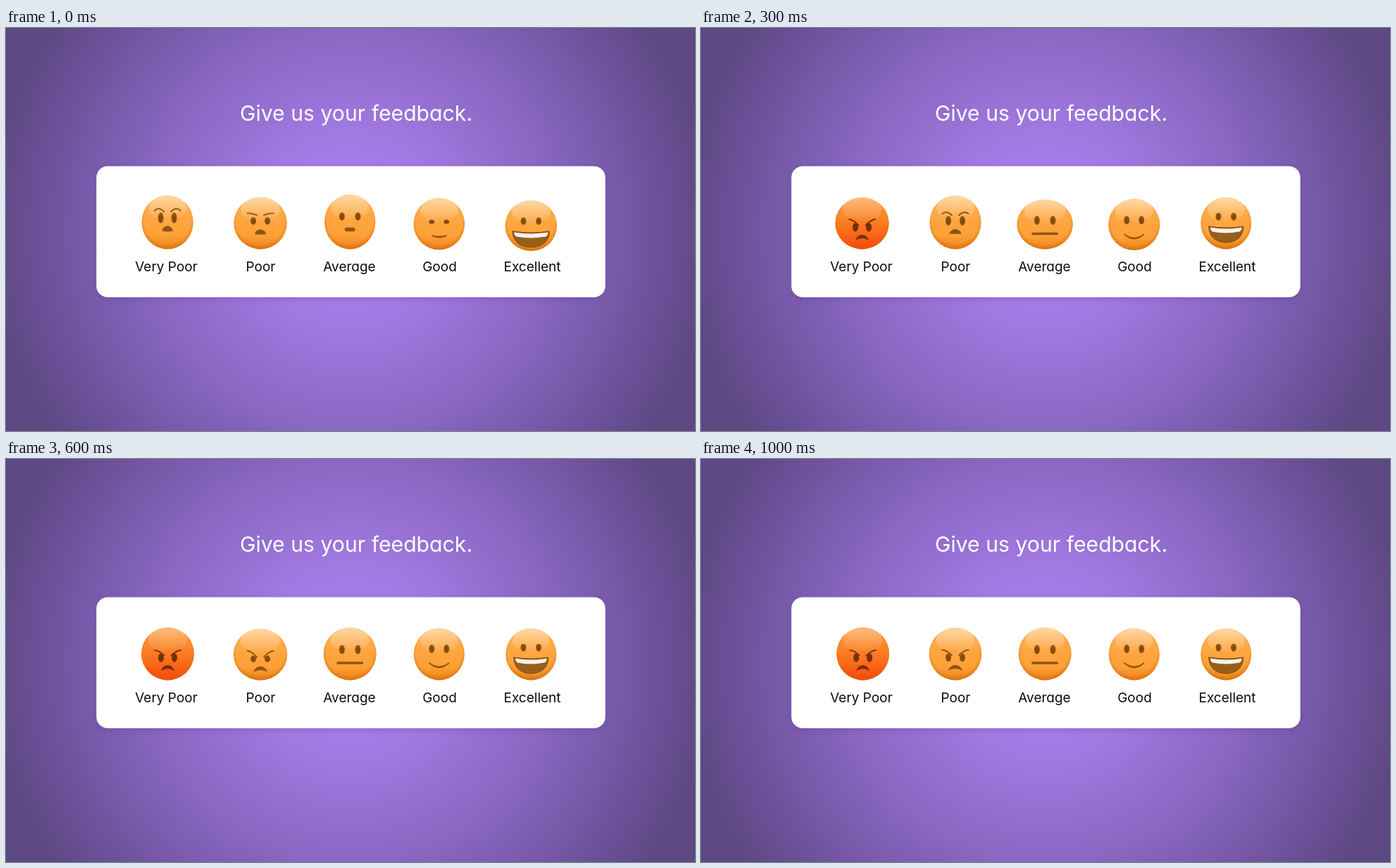
An HTML page that plays this animation: 978 by 573 pixels, repeating every 1100 ms.

```html
<!DOCTYPE html>
<html lang="en">
<head>
<meta charset="utf-8">
<title>Feedback</title>
<style>
  html, body { margin: 0; width: 100%; height: 100%; overflow: hidden; background: #5e4883; }
  svg { display: block; width: 978px; height: 573px; }
  text { font-family: Inter, Lato, sans-serif; text-anchor: middle; font-feature-settings: "cv11"; }
  .title { font-size: 30.2px; fill: #fff; }
  .label { font-size: 19px; fill: #0c0c0c; }
</style>
</head>
<body>
<svg viewBox="0 0 978 573" xmlns="http://www.w3.org/2000/svg">
  <defs>
    <radialGradient id="bg" gradientUnits="userSpaceOnUse" cx="489" cy="287" r="512">
      <stop offset="0" stop-color="#ac81f1"/>
      <stop offset=".26" stop-color="#a17ae2"/>
      <stop offset=".56" stop-color="#8967c2"/>
      <stop offset=".82" stop-color="#70549f"/>
      <stop offset="1" stop-color="#5e4883"/>
    </radialGradient>
    <linearGradient id="skin" x2="0" y2="1">
      <stop offset="0" stop-color="#ffb452"/>
      <stop offset=".4" stop-color="#fea743"/>
      <stop offset=".75" stop-color="#fda036"/>
      <stop offset="1" stop-color="#e98319"/>
    </linearGradient>
    <linearGradient id="rage" x2="0" y2="1">
      <stop offset="0" stop-color="#fb9c3a"/>
      <stop offset=".4" stop-color="#fb8427"/>
      <stop offset=".7" stop-color="#fb6818"/>
      <stop offset="1" stop-color="#f4480b"/>
    </linearGradient>
    <radialGradient id="rim" cy=".45" r=".57" fy=".45">
      <stop offset=".79" stop-color="#d96d08" stop-opacity="0"/>
      <stop offset=".91" stop-color="#d06808" stop-opacity=".4"/>
      <stop offset="1" stop-color="#c45f08" stop-opacity=".75"/>
    </radialGradient>
    <linearGradient id="shine" x2="0" y2="1">
      <stop offset="0" stop-color="#fff" stop-opacity=".48"/>
      <stop offset="1" stop-color="#fff" stop-opacity="0"/>
    </linearGradient>
    <filter id="soft" x="-10%" y="-20%" width="120%" height="140%">
      <feGaussianBlur stdDeviation="5"/>
    </filter>
  </defs>
  <rect width="978" height="573" fill="url(#bg)"/>
  <text class="title" x="497" y="132">Give us your feedback.</text>
  <rect x="129" y="199" width="721" height="186" rx="16" fill="#4b2a86" opacity=".25" filter="url(#soft)"/>
  <rect x="128.3" y="196.6" width="722.4" height="186.2" rx="16" fill="#fff"/>
  <g id="labels"></g>
  <g id="faces"></g>
</svg>
<script>
const STEP = 100, STEPS = 11, FLOOR = 314.4;

// Pairs run from the opening value to the resting one over the "turn" steps.
// "swing" is one soft wobble: it squashes the face, lowers it (drop) and moves its features (bob).
const FACES = [
  { label: "Very Poor", textX: 227.5, x: 229.2, r: 37.4, turn: [.8, 2.6], lead: 1.2, rage: true, shake: .6,
    swing: { mid: 2, half: 3.5, squash: .023, bob: 1 },
    eyes: { y: [271, 282.6], gap: 9.5, h: [7.5, 6.2] },
    mouth: { draw: frown, y: [286, 297.3], w: [8, 9.5], h: [7, 8] } },
  { label: "Poor", textX: 361.5, x: 361.1, r: 37.3, turn: [2, 5], lead: 0,
    swing: { mid: 4.3, half: 3.8, squash: .024, bob: 2 },
    eyes: { y: [273.5, 282.3], gap: 10, h: [5.8, 5.8], stretch: 1.1 },
    mouth: { draw: frown, y: [289, 297], w: [8.3, 10], h: [6.5, 8] } },
  { label: "Average", textX: 487.5, x: 488.2, r: 37.5, turn: [0, 2], blink: 1.25,
    swing: { mid: .8, half: 4, squash: .06, bob: 2.6 },
    eyes: { y: [269.5, 271], gap: 11.3, h: [6.4, 6.4] },
    mouth: { draw: flat, y: [288, 290], w: [7.5, 19], h: [5.5, 3.4] } },
  { label: "Good", textX: 615.5, x: 614.8, r: 36.5, turn: [0, 2], blink: -.7, rest: -.013,
    swing: { mid: -.5, half: 4.5, squash: .022, bob: 5, drop: 2.4 },
    eyes: { y: [273.8, 270], gap: 10.5, h: [6, 6] },
    mouth: { draw: smile, y: [293.3, 290], w: [10.5, 14], h: [2.2, 6] } },
  { label: "Excellent", textX: 747, x: 745.3, r: 36.4, turn: [0, 3], rest: -.012,
    swing: { mid: -2, half: 4, squash: .023, bob: 5, drop: 2.6 },
    eyes: { y: [269.5, 268.2], gap: 10.8, h: [5.2, 5.5] },
    mouth: { draw: grin, y: [283, 281], w: [26.3, 24.5], h: [23.5, 24] } }
];

const mix = ([a, b], k) => a + (b - a) * k;

function ease(t, [from, to]) {
  const k = Math.min(1, Math.max(0, (t - from) / (to - from)));
  return k * k * (3 - 2 * k);
}

const swingAt = (t, { mid, half }) =>
  t > mid + half ? 0 : Math.sin(Math.PI * (t - mid) / half);

const ellipse = (x, y, rx, ry, fill, opacity = 1) =>
  `<ellipse cx="${x}" cy="${y}" rx="${rx}" ry="${ry}" fill="${fill}" opacity="${opacity}"/>`;
const line = (d, color, width) =>
  `<path d="${d}" fill="none" stroke="${color}" stroke-width="${width}" stroke-linecap="round"/>`;
const shape = (d, fill) => `<path d="${d}" fill="${fill}" stroke-linejoin="round"/>`;

function frown(x, y, w, h, ink, k) {
  const base = y + h / 2, arch = h * (k - .25);
  return shape(`M${x - w} ${base}C${x - w * .65} ${y - h * .83} ${x + w * .65} ${y - h * .83} ${x + w} ${base}
    Q${x} ${base - arch} ${x - w} ${base}Z`, ink);
}

function flat(x, y, w, h, ink) {
  return `<rect x="${x - w}" y="${y - h / 2}" width="${2 * w}" height="${h}" rx="${h / 2}" fill="${ink}"/>`;
}

function smile(x, y, w, h, ink) {
  const d = `M${x - w} ${y}Q${x} ${y + h * 2 + 1} ${x + w} ${y}Q${x} ${y + h * 2 - 1} ${x - w} ${y}Z`;
  return shape(d, ink) + line(d, ink, 1.7);
}

function grin(x, y, w, h) {
  const lips = `M${x - w} ${y + 1}Q${x} ${y + 5} ${x + w} ${y + 1}C${x + w} ${y + h * .65} ${x + w * .6} ${y + h} ${x} ${y + h}
    C${x - w * .6} ${y + h} ${x - w} ${y + h * .65} ${x - w} ${y + 1}Z`;
  const t = w - 2;
  const teeth = `M${x - t} ${y + 2.6}Q${x} ${y + 6.4} ${x + t} ${y + 2.6}
    Q${x + t} ${y + 6} ${x + t - 3} ${y + 8.4}Q${x} ${y + 12.5} ${x - t + 3} ${y + 8.4}Q${x - t} ${y + 6} ${x - t} ${y + 2.6}Z`;
  return shape(lips, "#96601b") + line(lips, "#7f4c12", 1) + shape(teeth, "#f4f2ef");
}

function eye(x, y, h, ink) {
  if (h < 1.5) return line(`M${x - 4.5} ${y + .6}Q${x} ${y - 1.8} ${x + 4.5} ${y + .6}`, ink, 1.5);
  return ellipse(x, y, 4, h, ink) + ellipse(x, y + h * .15, 2.3, h * .6, "#6f3c08", .4);
}

function brows(x, eyeY, k, anger, swing, ink) {
  const tilt = mix([2, 7.5], anger) + 1.5 * swing;
  const arch = (1 - anger) * (3 - 5 * swing);
  const mid = eyeY - 9.5 + 2.5 * k;
  const brow = s => `M${x + s * 18.5} ${mid - tilt / 2}
    Q${x + s * 12.5} ${mid - tilt / 2 + .3 - arch} ${x + s * 5} ${mid + tilt / 2}`;
  return line(brow(-1) + brow(1), ink, 1.9);
}

function drawFace({ x, r, turn, lead, rage, shake = 0, blink, rest = 0, swing, eyes, mouth }, t) {
  const k = ease(t, turn), s = swingAt(t, swing);
  const squash = rest + swing.squash * s;
  const rx = r * (1 + squash), ry = r * (1 - squash);
  const cx = x + shake * k * Math.cos((t - 5.2) * Math.PI / 2.5);
  const cy = FLOOR - ry + (swing.drop || 0) * s;
  const bob = swing.bob * s;
  const closed = blink === undefined ? 0 : .92 * Math.exp(-1.3 * (t - blink) ** 2);
  const eyeY = mix(eyes.y, k) + bob;
  const eyeH = (mix(eyes.h, k) - (eyes.stretch || 0) * s) * (1 - closed);
  const red = rage ? k : 0;
  const ink = red > .5 ? "#74300a" : "#8f5512";

  return ellipse(cx, cy, rx, ry, "url(#skin)") +
    ellipse(cx, cy, rx, ry, "url(#rage)", red) +
    ellipse(cx, cy, rx, ry, "url(#rim)", 1 - red * .5) +
    ellipse(cx, cy - ry * .52, rx * .74, ry * .47, "url(#shine)", 1 - red * .3) +
    eye(cx - eyes.gap, eyeY, eyeH, ink) + eye(cx + eyes.gap, eyeY, eyeH, ink) +
    (lead === undefined ? "" : brows(cx, eyeY, k, ease(t + lead, turn), s, ink)) +
    mouth.draw(cx, mix(mouth.y, k) + bob, mix(mouth.w, k), mix(mouth.h, k), ink, k);
}

document.getElementById("labels").innerHTML =
  FACES.map(f => `<text class="label" x="${f.textX}" y="346">${f.label}</text>`).join("");

const stage = document.getElementById("faces");
const start = performance.now();
let shown = -1;

function tick() {
  const step = Math.floor((performance.now() - start) / STEP) % STEPS;
  if (step !== shown) {
    stage.innerHTML = FACES.map(f => drawFace(f, step)).join("");
    shown = step;
  }
  requestAnimationFrame(tick);
}
tick();
</script>
</body>
</html>
```
